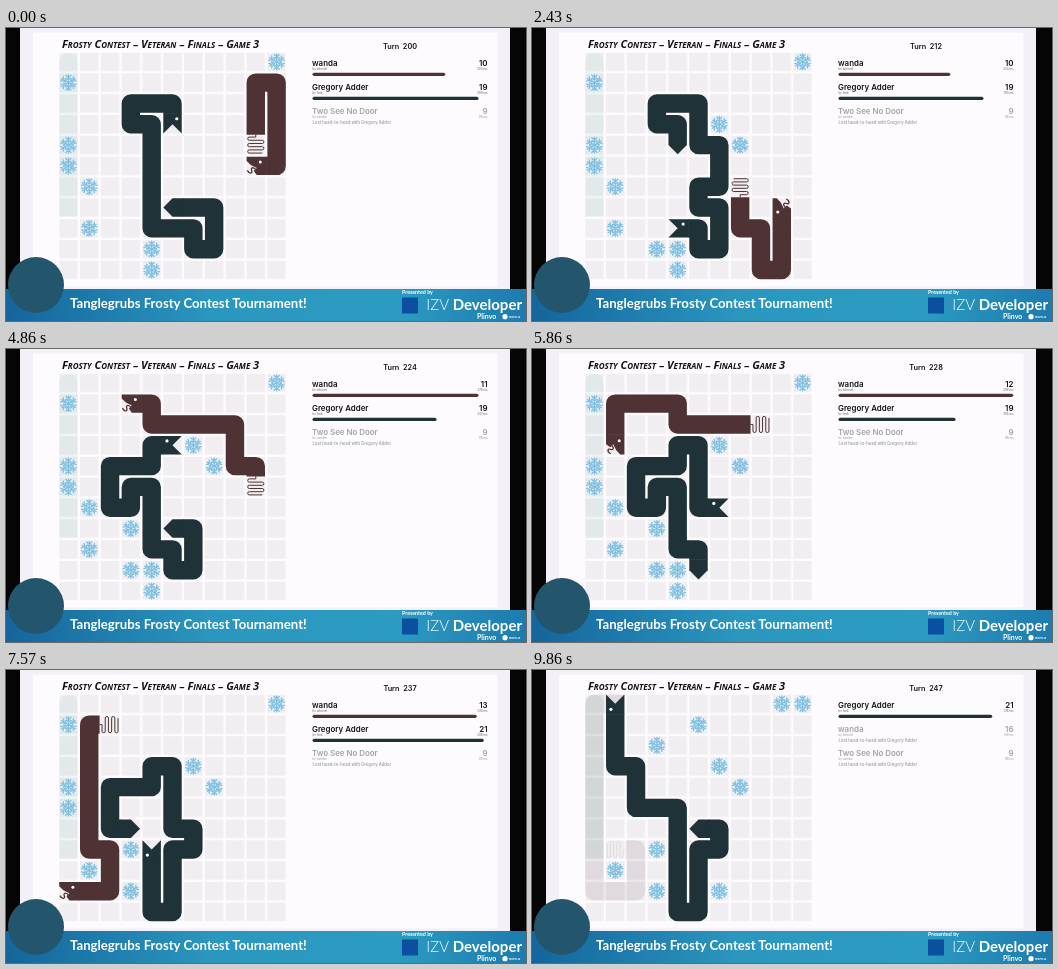
These frames come from a looping animation (520 px wide and 293 px high, 10 s). An HTML page:

```html
<!DOCTYPE html>
<html lang="en">
<head>
<meta charset="utf-8">
<title>Snake match</title>
<style>
html, body { margin: 0; width: 100%; height: 100%; overflow: hidden; background: #000; }
svg { display: block; width: 520px; height: 293px; }
text { font-family: Inter, sans-serif; font-weight: 600; white-space: pre; }
.title { font: italic small-caps 700 11px "Open Sans", sans-serif; fill: #111; }
.name { font-size: 7.9px; }
.tiny { font-size: 2.9px; font-weight: 500; fill: #777; }
.loss { font-size: 4.2px; }
.out, .out .tiny { fill: #a3a3a6; }
.end { text-anchor: end; }
.banner text { font-family: Lato, sans-serif; font-weight: 700; fill: #fff; }
#board { filter: blur(.35px); }
</style>
</head>
<body>
<svg viewBox="0 0 520 293">
  <defs>
    <pattern id="cells" patternUnits="userSpaceOnUse" x="53.2" y="24.6" width="20.82" height="20.82">
      <rect width="18.4" height="18.4" fill="#f1eef2"/>
    </pattern>
    <linearGradient id="blue">
      <stop offset="0" stop-color="#14659c"/>
      <stop offset=".4" stop-color="#2b97bf"/>
      <stop offset=".75" stop-color="#2c9bc1"/>
      <stop offset="1" stop-color="#1d7bae"/>
    </linearGradient>
    <g id="flake" fill="none" stroke="#83bfde" stroke-width="1.3" stroke-linecap="round"></g>
  </defs>
  <rect width="520" height="293" fill="#050505"/>
  <rect x="14" width="490" height="262" fill="#f3f0f8"/>
  <rect x="27" y="4.5" width="464.5" height="254" fill="#fdfbfe"/>
  <rect x="53.2" y="24.6" width="226.7" height="226.7" fill="url(#cells)"/>
  <text class="title" x="56" y="20">Frosty Contest – Veteran – Finals – Game 3</text>
  <g id="board"></g>
  <g id="panel" fill="#151515"></g>
  <g class="banner">
    <rect y="261" width="520" height="32" fill="url(#blue)"/>
    <circle cx="30" cy="257" r="28" fill="#23566d"/>
    <text x="64" y="280" font-size="13.2">Tanglegrubs Frosty Contest Tournament!</text>
    <text x="396" y="265.8" font-size="5.3">Presented by</text>
    <rect x="396" y="269.5" width="16" height="16" fill="#0a4fa0"/>
    <text class="end" x="516" y="282" font-size="15"><tspan font-weight="300">IZV</tspan> Developer</text>
    <text x="471" y="291" font-size="7">Plinvo</text>
    <circle cx="499" cy="288.7" r="2.6" fill="#fff"/>
    <text x="503" y="290.3" font-size="4">norv.o</text>
  </g>
</svg>
<script>
const LOOP = 10000, TURN = 204.5, LEAD = 50, LAST = 47, PITCH = 20.82;
const STEP = { R: [1, 0], L: [-1, 0], U: [0, -1], D: [0, 1] };
const FACE = { R: '', L: 'scale(-1 1)', U: 'rotate(-90)', D: 'rotate(90)' };
const BACK = { R: 'L', L: 'R', U: 'D', D: 'U' };
const $ = id => document.getElementById(id);
const at = (x, y) => [62.4 + x * PITCH, 33.8 + y * PITCH];
const mid = (a, b) => [(a[0] + b[0]) / 2, (a[1] + b[1]) / 2];

// Cells from the first tail to the last head; eats holds turns since the start.
function snake(name, by, color, x, y, size, health, eats, moves, head, tail) {
  const cells = [at(x, y)];
  for (const m of moves) cells.push(at(x += STEP[m][0], y += STEP[m][1]));
  return { name, by, color, size, health, eats, moves, cells, head, tail };
}

const coil = () => {
  let d = 'M-10.5 0H-8V6.5';
  for (let i = 0; i < 5; i++) {
    const s = i % 2 ? -1 : 1;
    d += `a1.6 1.6 0 0 ${i % 2} 3.2 0V${-6.5 * s}`;
  }
  return `<path d="${d}" fill="none" stroke="currentColor" stroke-width="1"/>`;
};
const biter = `<path d="M-11-9.2H9.2L0 0 9.2 9.2H-11z" fill="currentColor"/>
  <circle cx="-5.5" cy="-4.3" r="1.6" fill="#fff"/>`;
const licker = `<path d="M-11-9.2H9.2V-5L5-1-1 2 2 5-1 9.2H-11z" fill="currentColor"/>
  <circle cx="-4.5" cy="-4" r="1.5" fill="#fff"/>
  <path d="M0 3.5C4 0 5 3 4 5S6 9 8.5 4.5" fill="none" stroke="currentColor" stroke-width="1.3"/>`;
const spike = '<path d="M-11-9.2H0L9.2 0 0 9.2H-11z" fill="currentColor"/>';

const brown = snake('wanda', 'by tobrinel', '#4f3233', 9, 4, 10, 76, [19, 28, 31, 41, 42, 45],
  'UUURDDDDL' + 'LLDD' + 'DRDDRUUU' + 'UUULUULLLLUL' + 'LLDDDDDDR' + 'DDLLUUUU' + 'UUUUUR',
  licker, coil());
const dark = snake('Gregory Adder', 'by fenk', '#1e3237', 5, 7, 19, 95, [34, 35],
  'RRDDLULLUUUUULURRD' + 'DRDD' + 'LDRDDLUL' + 'UUULDLUURRUR' + 'DDDRDLDDD' + 'LUUUUULL' + 'UULUUU',
  biter, spike);

// Food as [column, row, first turn, turn eaten].
const food = [
  [10, 0], [0, 1, 0, 45], [0, 4, 0, 42], [0, 5, 0, 41], [1, 6, 0, 31], [1, 8],
  [4, 9, 0, 35], [4, 10, 0, 34], [3, 9, 7], [6, 3, 9], [7, 4, 11], [7, 2, 16, 19],
  [3, 7, 21], [1, 3, 26, 28], [6, 9, 38], [9, 0, 40], [5, 1, 43], [3, 2, 45]
];

$('flake').innerHTML = '<circle r="7.8" fill="#e0f0f9" stroke="none"/>' +
  [0, 60, 120, 180, 240, 300].map(a =>
    `<path transform="rotate(${a})" d="M0 0V-8M-2.6-7.4L0-5 2.6-7.4M-2-4.4L0-2.6 2-4.4"/>`).join('');

function drawSnake(s, k, alpha) {
  const end = s.size - 1 + k;
  const start = end - s.size - s.eats.filter(e => e < k).length + 1;
  const c = s.cells.slice(start, end + 1), n = c.length;
  const line = [mid(c[0], c[1]), ...c.slice(1, n - 1), mid(c[n - 2], c[n - 1])];
  const part = (p, dir, art) => `<g transform="translate(${p}) ${FACE[dir]}">${art}</g>`;
  return `<g color="${s.color}" opacity="${alpha}">
    <path d="M${line.join('L')}" fill="none" stroke="currentColor" stroke-width="18.4" stroke-linejoin="round"/>
    ${part(c[0], BACK[s.moves[start]], s.tail)}${part(c[n - 1], s.moves[end - 1], s.head)}</g>`;
}

function row(i, name, by, score, ms, extra, out) {
  const y = 38 + i * 24.1;
  return `<g class="${out ? 'out' : ''}">
    <text class="name" x="306" y="${y}">${name}</text>
    <text class="name end" x="481.5" y="${y}">${score}</text>
    <text class="tiny" x="306.5" y="${y + 4}">${by}</text>
    <text class="tiny end" x="481.5" y="${y + 4}">${ms} ms</text>${extra(y)}</g>`;
}
const lost = y => `<text class="loss" x="306.5" y="${y + 10}">Lost head-to-head with ${dark.name}</text>`;

function snakeRow(i, s, k, out) {
  const ate = s.eats.filter(e => e <= k);
  const health = ate.length ? 100 - k + ate[ate.length - 1] : s.health - k;
  const bar = y => `<rect x="306.5" y="${y + 6.7}" width="${health * 1.747}" height="3.3" rx="1.65" fill="${s.color}"/>`;
  const ms = 190 + (k * 37 + s.size * 11) % 130;
  return row(i, s.name, s.by, s.size + ate.length, ms, out ? lost : bar, out);
}

function draw(k) {
  const over = k === LAST;
  const flakes = food.filter(([, , from = 0, to = 99]) => k >= from && k < to)
    .map(([x, y]) => `<use href="#flake" transform="translate(${at(x, y)})"/>`).join('');
  const ghost = '<path d="M53.3 188.6V33.8a9.1 9.1 0 0 1 18.2 0V188.6z" fill="#3fae90" opacity=".08"/>';
  $('board').innerHTML = ghost + (over ? drawSnake(brown, k, .1) : '') + flakes +
    (over ? '' : drawSnake(brown, k, 1)) + drawSnake(dark, k, 1);
  $('panel').innerHTML =
    `<text x="394" y="20.5" font-size="7.3" text-anchor="middle">Turn  ${200 + k}</text>` +
    snakeRow(over ? 1 : 0, brown, k, over) + snakeRow(over ? 0 : 1, dark, k) +
    row(2, 'Two See No Door', 'by varnike', 9, 88, lost, true);
}

let shown = -1;
function tick() {
  const t = performance.now() % LOOP;
  const k = Math.min(LAST, Math.floor((t + LEAD) / TURN));
  if (k !== shown) draw(shown = k);
  requestAnimationFrame(tick);
}
tick();
</script>
</body>
</html>
```
